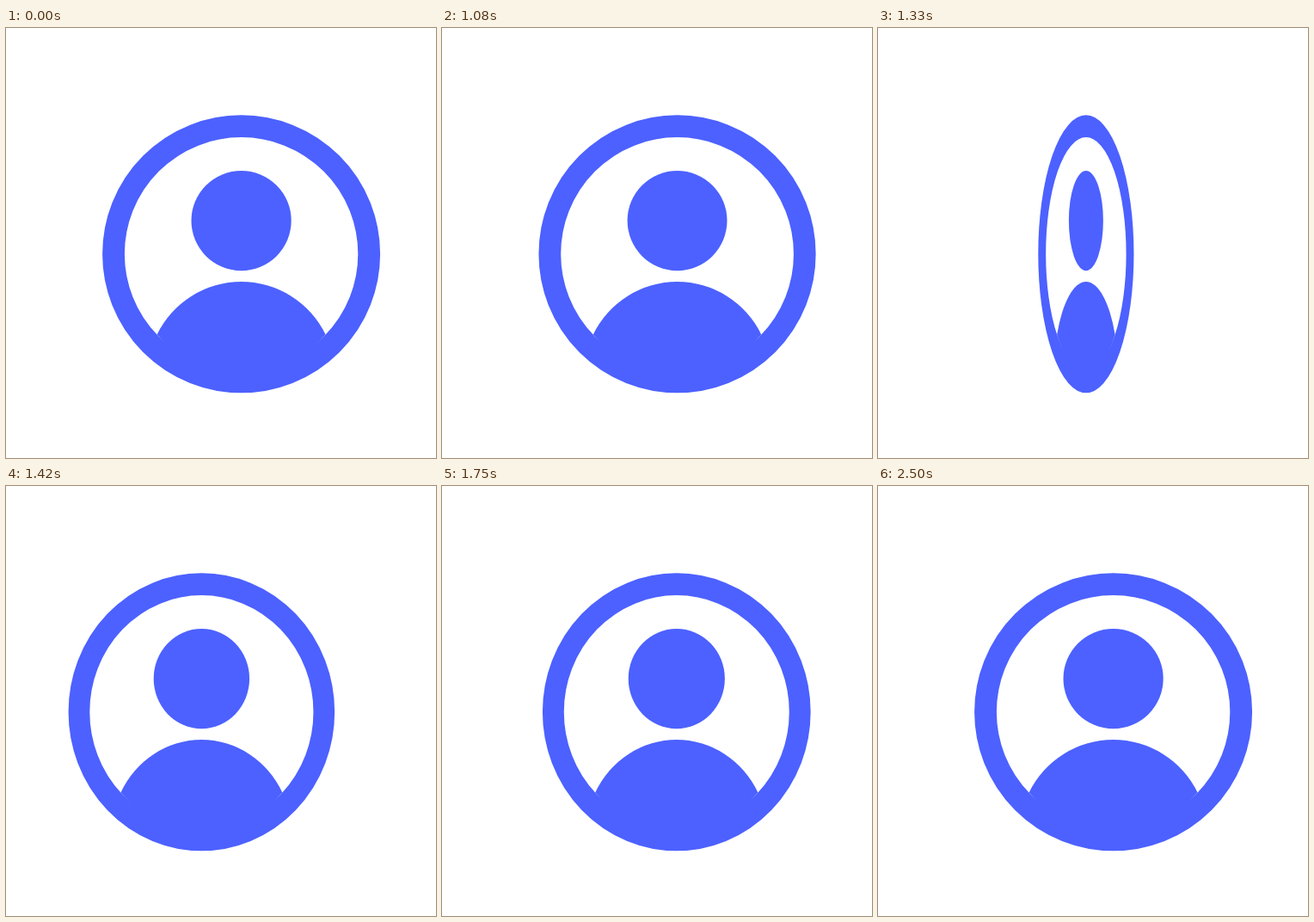
Recreate the animation shown at these times as an HTML page. Size 500 by 500 pixels, loop 2.58 s.

```html
<!DOCTYPE html>
<html lang="en">
<head>
<meta charset="utf-8">
<title>Spinning profile icon</title>
<style>
  html, body { margin: 0; height: 100%; overflow: hidden; background: #fff; }
  svg { display: block; width: 100%; height: 100%; }
</style>
</head>
<body>
<svg viewBox="0 0 500 500">
  <g id="icon" fill="#4c61ff">
    <g transform="translate(23.6 262.8)">
      <circle r="148.6" fill="none" stroke="#4c61ff" stroke-width="25.8"/>
      <circle cy="-38.7" r="58.1"/>
      <path d="M-98 93.6A109 109 0 0 1 98 93.6A130 130 0 0 1 -98 93.6"/>
    </g>
  </g>
</svg>
<script>
  const LOOP = 2580, STEP = 250 / 3;   // 12 steps per second
  const START = 12.388, SPAN = 9.828;  // the turn, in steps
  const icon = document.getElementById('icon');

  function draw(now) {
    const t = now % LOOP;
    const step = Math.floor((Math.floor(t / 10) * 10 + 5) / STEP);
    const u = Math.min(1, Math.max(0, (step - START) / SPAN));
    const turn = u * u * (3 - 2 * u);
    // One full turn about the vertical centre line, seen flat
    const width = Math.cos(2 * Math.PI * turn);
    icon.setAttribute('transform', `translate(250 0) scale(${width.toFixed(5)} 1)`);
  }

  let origin;
  function tick(now) {
    origin ??= now;
    draw(now - origin);
    requestAnimationFrame(tick);
  }
  draw(0);
  requestAnimationFrame(tick);
</script>
</body>
</html>
```
